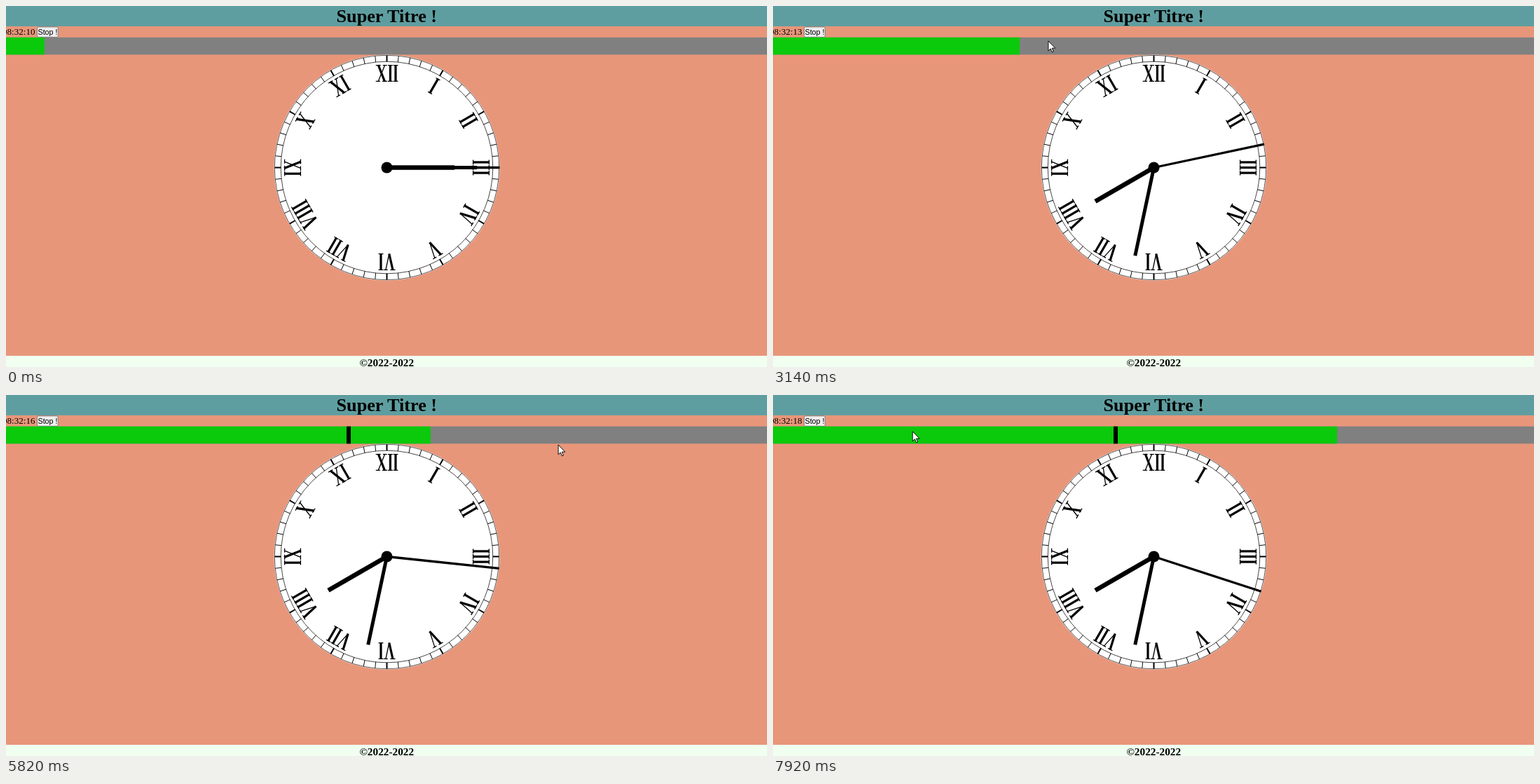
Animation of 1086x515 px, one loop 7.99 s. Source, as an HTML page:

```html
<!DOCTYPE html>
<html lang="fr">
<head>
<meta charset="utf-8">
<title>Super Titre !</title>
<style>
  html, body { margin: 0; width: 100%; height: 100%; overflow: hidden; background: #e8967a; }
  svg { display: block; width: 1086px; height: 515px; }
  .serif { font-family: "Liberation Serif", "Times New Roman", serif; }
  .bold { font-weight: bold; text-anchor: middle; }
  .sans { font-family: "Liberation Sans", Arial, sans-serif; }
</style>
</head>
<body>
<svg viewBox="0 0 1086 515">
  <rect width="1086" height="515" fill="#e8967a"/>
  <rect width="1086" height="29" fill="#5f9ea0"/>
  <text class="serif bold" x="543.3" y="23" font-size="26.2">Super Titre !</text>

  <text id="time" class="serif" x="-5" y="41.4" font-size="13.1"></text>
  <g id="stop">
    <rect x="44.5" y="29.9" width="29.8" height="14.5" rx="2" fill="#efefef" stroke="#767676" stroke-width=".9"/>
    <text class="sans" x="45.5" y="41" font-size="10.7">Stop !</text>
  </g>

  <rect y="44.8" width="1086" height="24.6" fill="#808080"/>
  <rect id="bar" y="44.8" height="24.6" fill="#0bc90b"/>
  <rect id="mark" x="486" y="44.8" width="6" height="24.6"/>

  <g transform="translate(543.5 230.5)" stroke="#000" fill="none">
    <circle r="161" fill="#fff" stroke="none"/>
    <circle r="160.2" stroke="#333" stroke-width=".8"/>
    <circle r="151.3" stroke="#333" stroke-width=".9"/>
    <g id="dial"></g>
    <path id="hour" d="M0 0V-96.5" stroke-width="6.6"/>
    <path id="minute" d="M0 0V-128.5" stroke-width="5"/>
    <path id="second" d="M0 0V-161" stroke-width="3.3"/>
    <circle r="8" fill="#000" stroke="none"/>
  </g>

  <rect y="499" width="1086" height="16" fill="#f0fff0"/>
  <text class="serif bold" x="543.3" y="513.6" font-size="15.3">©2022-2022</text>

  <path id="cursor" d="M0 0V16.5L3.8 12.9 6.3 18.8 8.7 17.8 6.2 12H11.6Z" fill="#fff" stroke="#000" stroke-width="1.1"/>
</svg>
<script>
const $ = id => document.getElementById(id);
const LOOP = 7990, FIRST_TICK = 450, TICK = 1028;

// Pointer tip at a few moments: [ms, x, y]
const POINTER = [
  [480, 1020, 500], [960, 408, 283], [1600, 95, 80], [2300, 300, 46], [2580, 300, 47],
  [3920, 522, 54], [5820, 788, 71], [6550, 876, 72], [7280, 720, 107], [7920, 200, 52]
];

// Roman letters, 24 high: width, thick strokes, thin strokes with serifs
const LETTERS = {
  I: [7.6, "M3.8 -12V12", "M.4 -11.4H7.2M.4 11.4H7.2"],
  V: [17, "M3.7 -12L9 11.5", "M14 -12L9 11.5M.2 -11.4H7.4M11 -11.4H16.8"],
  X: [17.4, "M4 -12L13.4 12", "M13.6 -12L3.8 12M.5 -11.4H7.6M10.6 -11.4H16.6M.5 11.4H6.8M9.8 11.4H17"]
};
const NUMERALS = "XII I II III IV V VI VII VIII IX X XI".split(" ");

const path = (d, width, extra = "") => `<path d="${d}" stroke-width="${width}" ${extra}/>`;

function tickMark(i) {
  return path("M0 -151V-160.2", i % 5 ? 0.9 : 2, `transform="rotate(${i * 6})"`);
}

function numeral(word, hour) {
  const letters = [...word].map(c => LETTERS[c]);
  let x = -letters.reduce((sum, [width]) => sum + width, 0) / 2;
  const glyphs = letters.map(([width, thick, thin]) => {
    const glyph = `<g transform="translate(${x} 0)">${path(thick, 3.2)}${path(thin, 1.3)}</g>`;
    x += width;
    return glyph;
  });
  return `<g transform="rotate(${hour * 30}) translate(0 -134.5)">${glyphs.join("")}</g>`;
}

function pointerAt(t) {
  const i = Math.max(1, POINTER.findIndex(key => key[0] >= t));
  const next = POINTER.at(t > POINTER.at(-1)[0] ? -1 : i);
  const prev = POINTER[POINTER.indexOf(next) - 1];
  const k = (t - prev[0]) / (next[0] - prev[0]);
  return [1, 2].map(n => prev[n] + (next[n] - prev[n]) * k);
}

const turn = (id, deg) => $(id).setAttribute("transform", `rotate(${deg})`);
const show = (id, on) => $(id).style.display = on ? "" : "none";

function render(t) {
  const ticks = Math.max(0, Math.floor((t - FIRST_TICK) / TICK) + 1);
  const sec = 10 + ticks;

  $("time").textContent = `08:32:${sec}`;
  // The digits "11" are set closer, which pulls the button along
  $("stop").setAttribute("transform", `translate(${sec === 11 ? -1 : 0} 0)`);

  // Hands rest at three o'clock until the first tick
  turn("hour", ticks ? 8 * 30 : 90);
  turn("minute", ticks ? 32 * 6 : 90);
  turn("second", ticks ? sec * 6 : 90);

  const width = 54.5 + t * 0.0948;
  $("bar").setAttribute("width", Math.round(width));
  show("mark", width >= 491);

  const [x, y] = pointerAt(t);
  $("cursor").setAttribute("transform", `translate(${x} ${y}) scale(.85)`);
  show("cursor", t >= POINTER[0][0]);
}

$("dial").innerHTML = Array.from({ length: 60 }, (_, i) => tickMark(i)).join("") + NUMERALS.map(numeral).join("");

const start = performance.now();
function loop() {
  render((performance.now() - start) % LOOP);
  requestAnimationFrame(loop);
}
loop();
</script>
</body>
</html>
```
